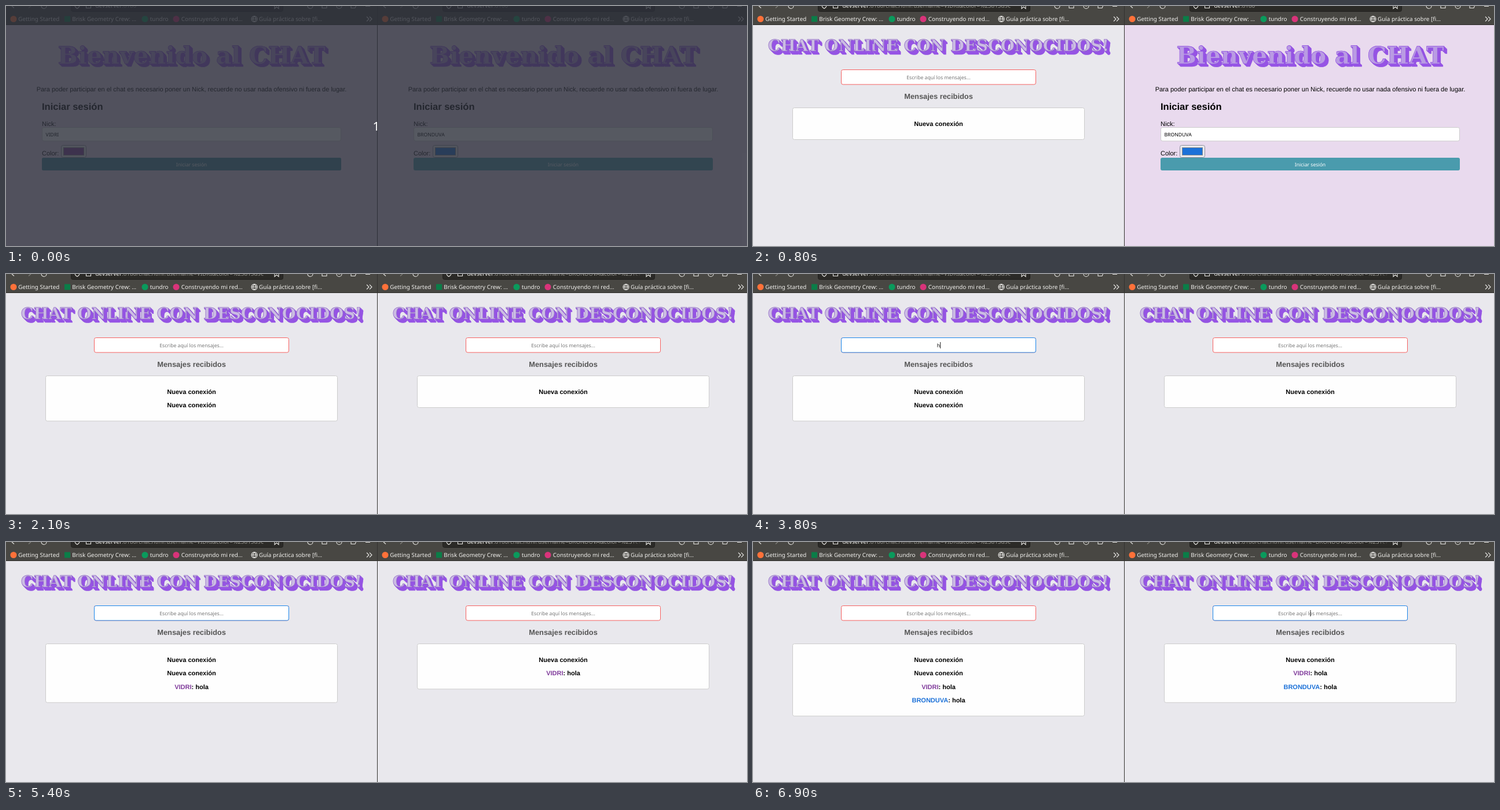
An HTML page that plays this animation: 1280x416 px, repeating every 8 s.

```html
<!DOCTYPE html>
<html lang="es">
<head>
<meta charset="utf-8">
<title>Chat</title>
<style>
  html, body { margin: 0; width: 100%; height: 100%; overflow: hidden; background: #e9e8ed; }
  svg { display: block; width: 1280px; height: 416px; }
  text { font: 11px "Liberation Sans", Arial, sans-serif; text-rendering: geometricPrecision; white-space: pre; }
  .mid { text-anchor: middle; }
  .bold { font-weight: bold; }
  .h2 { font-size: 16.5px; font-weight: bold; }
  .h3 { font-size: 12.87px; font-weight: bold; fill: #555; }
  .ui { font: 8.65px "Noto Sans", "Open Sans", sans-serif; }
  .hint { fill: #757575; }
  .bar { font: 9.9px "Noto Sans", "Open Sans", sans-serif; fill: #f2f1ee; }
  .path { fill: #96958f; }
  .count { font: 21px "Noto Sans", "Open Sans", sans-serif; fill: #fff; }
  .title { font: bold 41.25px "DejaVu Serif", serif; text-anchor: middle; stroke: #9455e2; stroke-width: .7px; fill: #b99be3; }
  .title.small { font-size: 27.5px; }
  .title.small .face { fill: #cbbce3; stroke: #8b62c4; }
  .title .depth { fill: #9b55e8; }
  .title text { font: inherit; }
  .icon { fill: none; stroke: #e8e7e4; stroke-width: 1.1px; }
  .dim { stroke: #85847f; }
</style>
</head>
<body>
<svg id="stage" viewBox="0 0 1280 416">
  <defs>
    <linearGradient id="fade"><stop offset="0" stop-color="#2b2a27" stop-opacity="0"/><stop offset="1" stop-color="#2b2a27"/></linearGradient>
    <clipPath id="half"><rect width="641" height="416"/></clipPath>
  </defs>
</svg>
<script>
const LOOP = 8000, MID = 320.5;
const users = {
  a: { nick: 'VIDRI', color: '#813d9c' },
  b: { nick: 'BRONDUVA', color: '#1c71d8' }
};
const panes = [
  { x: 0, user: users.a, hover: 0, login: 800, focus: [3000, 5700], typing: 3800, blink: 5400,
    url: '23813d9c', messages: [[800], [2100], [4300, users.a], [6900, users.b]] },
  { x: 642, user: users.b, hover: 1500, login: 2100, focus: [5700, LOOP], typing: 6300, blink: LOOP,
    url: '231c7', fade: true, messages: [[2100], [4400, users.a], [6800, users.b]] }
];

const during = (from, to, content) => `<g data-from="${from}" data-to="${to}">${content}</g>`;
const text = (x, y, cls, content) => `<text x="${x}" y="${y}" class="${cls}">${content}</text>`;
const box = (x, y, w, h, fill, stroke = 'none', r = 3) =>
  `<rect x="${x}" y="${y}" width="${w}" height="${h}" rx="${r}" fill="${fill}" stroke="${stroke}"/>`;
const icon = (d, cls = '') => `<path class="icon ${cls}" d="${d}"/>`;
const dot = (x, color) => `<circle cx="${x}" cy="22.5" r="5.5" fill="${color}"/>`;
const caret = x => `<path d="M${x} 118v11" stroke="#222"/>`;

function title(y, content, cls = '') {
  let layers = '';
  for (let i = 8; i >= 0; i--) {
    const d = i * .6875;
    layers += text(MID + d, y + d, i ? 'depth' : 'face', content);
  }
  return `<g class="title ${cls}">${layers}</g>`;
}

function browser(p) {
  const host = 'devserver<tspan class="path">:8180';
  const query = `/chat.html?username=${p.user.nick}&amp;color=%${p.url}`;
  return box(-2, -2, 646, 35, '#484743', 'none', 0) + box(0, 32, 642, 1, '#2c2b28', 'none', 0) +
    box(112.5, -10, 366, 19.5, '#2b2a27', '#201f1d') +
    during(0, p.login, text(154.5, 3, 'bar', host + '</tspan>')) +
    during(p.login, LOOP, text(154.5, 3, 'bar', host + query + '</tspan>') +
      (p.fade ? box(438, 0, 20, 8, 'url(#fade)', 'none', 0) + box(458, 0, 4, 8, '#2b2a27', 'none', 0) : '')) +
    icon('M10 0l4 3.5M61 0a4.5 4.5 0 0 0 9 0M119 0q1 3 4 4.5q3-1.5 4-4.5M138.5 0v3.5h8v-3.5') +
    icon('M464 0v4.5l3.5-3 3.5 3v-4.5M521 0a4.5 4.5 0 0 0 9 0M546 0v3.5h8v-3.5') +
    icon('M571 0a4.5 4.5 0 0 0 9 0M573.5 0h4M596 0v3.5h7l1.5-3.5M621 .5h8') + icon('M43 0l-4 3.5', 'dim') +
    dot(13, '#ff7139') + text(21.3, 26.3, 'bar', 'Getting Started') +
    box(101, 17.5, 10, 10, '#0a7d48', 'none', 0) + text(114.3, 26.3, 'bar', 'Brisk Geometry Crew: …') +
    dot(240, '#0a9a5c') + text(248.8, 26.3, 'bar', 'tundro') +
    dot(294, '#d9337a') + text(302.8, 26.3, 'bar', 'Construyendo mi red…') +
    icon('M424 22.5a5 5 0 0 1 10 0a5 5 0 0 1-10 0h10M429 17.5q-5 5 0 10q5-5 0-10') +
    text(437, 26.3, 'bar', 'Guía práctica sobre [fi…') +
    icon('M623 18.5l4 4-4 4M628 18.5l4 4-4 4');
}

function loginPage(p) {
  const button = fill => box(62, 263, 517, 22, fill);
  return box(0, 33, 641, 383, '#e9daee', 'none', 0) + title(99.5, 'Bienvenido al CHAT') +
    text(MID, 148, 'mid', 'Para poder participar en el chat es necesario poner un Nick, recuerde no usar nada ofensivo ni fuera de lugar.') +
    text(62, 180, 'h2', 'Iniciar sesión') +
    text(62, 208, '', 'Nick:') + box(62.5, 210.5, 516, 23.5, '#fff', '#ccc') +
    text(68.5, 226, 'ui', p.user.nick) +
    text(62, 259, '', 'Color:') + box(95.5, 241.5, 43, 21, '#e9e9ed', '#8f8f9d') +
    box(99.5, 245.5, 35, 13, p.user.color, '#8a8a8a', 0) +
    button('#4a9bad') + during(p.hover, p.login, button('#438a9b')) +
    `<g fill="#fff">${text(MID, 277.5, 'ui mid', 'Iniciar sesión')}</g>`;
}

function entry(p) {
  const field = stroke => box(152.5, 110.5, 336, 25.5, '#fff', stroke);
  const hint = text(MID, 126.7, 'ui mid hint', 'Escribe aquí los mensajes...');
  const [focus, blur] = p.focus, start = p.typing, sent = start + 500;
  const steps = [0, 100, 300, 400, 500], halves = [2.7, 5.3, 6.4, 8.9];
  const typed = halves.map((w, i) => during(start + steps[i], start + steps[i + 1],
    text(MID, 126.7, 'ui mid', 'hola'.slice(0, i + 1)) + caret(MID + w + .5)));
  return field('#f66161') + during(focus, blur, field('#1a86ea')) +
    during(0, start, hint) + during(sent, LOOP, hint) + typed.join('') +
    during(focus, start, caret(MID + .5)) + during(sent, p.blink, caret(MID + .5));
}

function chatPage(p) {
  const list = p.messages.map(([time, user], i, all) => {
    const next = i + 1 < all.length ? all[i + 1][0] : LOOP;
    const content = user ? `<tspan fill="${user.color}">${user.nick}</tspan>: hola` : 'Nueva conexión';
    return {
      frame: during(time, next, box(68.5, 176.5, 504, 55 + 23.4 * i, '#fefefe', '#ccc')),
      line: during(time, LOOP, text(MID, 208 + 23.4 * i, 'mid bold', content))
    };
  });
  return box(0, 33, 641, 383, '#e9e8ed', 'none', 0) +
    title(78.2, 'CHAT ONLINE CON DESCONOCIDOS!', 'small') + entry(p) +
    text(MID, 160.5, 'mid h3', 'Mensajes recibidos') +
    list.map(m => m.frame).join('') + list.map(m => m.line).join('');
}

const stage = document.getElementById('stage');
stage.insertAdjacentHTML('beforeend',
  panes.map(p => `<g transform="translate(${p.x})" clip-path="url(#half)">` +
    during(0, p.login, loginPage(p)) + during(p.login, LOOP, chatPage(p)) + browser(p) + '</g>').join('') +
  box(641, 0, 1, 416, '#33322f', 'none', 0) +
  during(0, 100, box(0, 0, 1280, 416, 'rgba(44,48,58,.8)', 'none', 0) + text(639.5, 215.5, 'count mid', '1')));

const timed = [...stage.querySelectorAll('[data-from]')].map(el => ({ el, from: +el.dataset.from, to: +el.dataset.to }));

function draw() {
  const t = performance.now() % LOOP;
  for (const { el, from, to } of timed) el.style.display = t >= from && t < to ? '' : 'none';
  requestAnimationFrame(draw);
}
draw();
</script>
</body>
</html>
```
